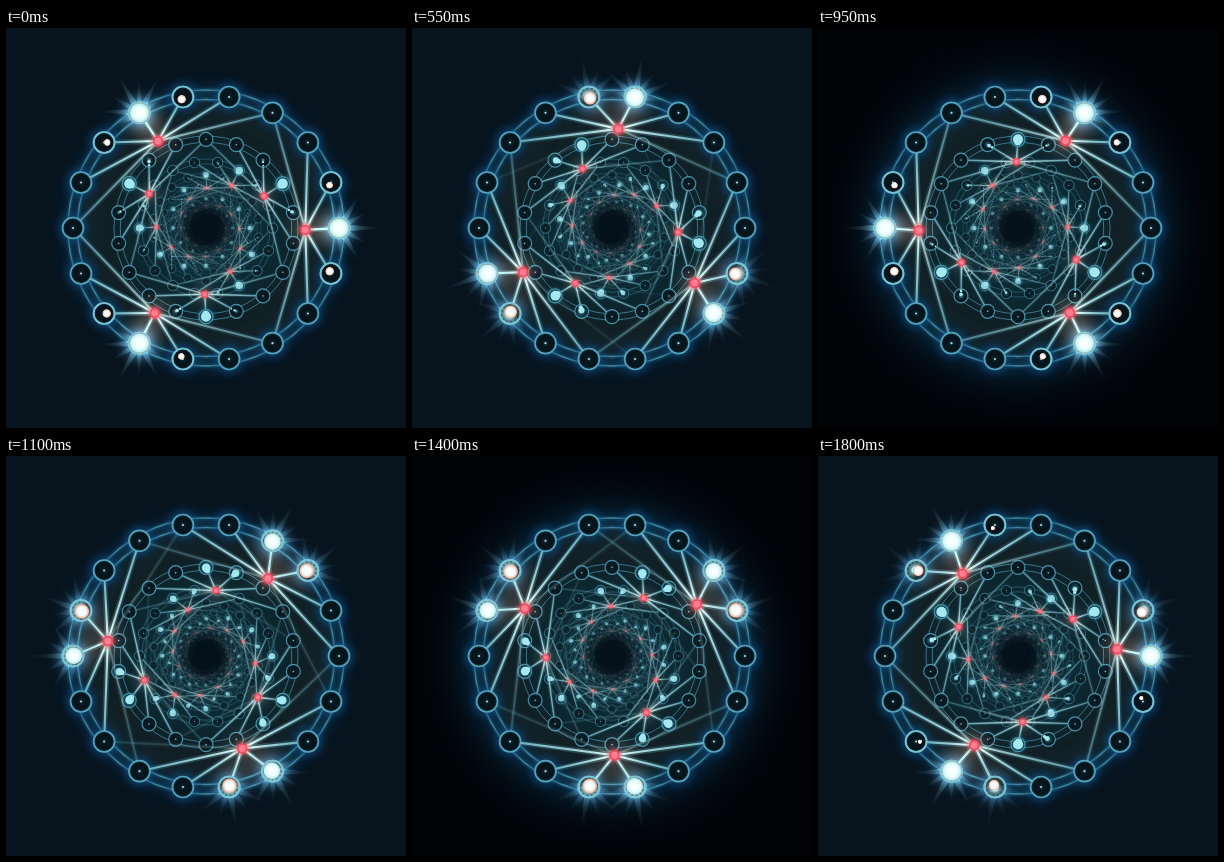
Animation of 400 by 400 pixels, one loop 1.85 s. Source, as an HTML page with a canvas:

```html
<!DOCTYPE html>
<html lang="en">
<head>
<meta charset="utf-8">
<title>Ring tunnel</title>
<style>
html, body { margin: 0; width: 100%; height: 100%; overflow: hidden; background: #07141e; }
canvas { display: block; width: 400px; height: 400px; }
</style>
</head>
<body>
<canvas id="stage" width="400" height="400"></canvas>
<script>
const ctx = document.getElementById('stage').getContext('2d');
const LOOP = 1850, STEP = 50, MID = 200, RAD = Math.PI / 180;
const RING = 133, HUB = 99.3, DEPTH = 13;

// The hubs move in 48 poses of 2.5 degrees at an uneven pace: [time in ms, pose]
const POSE = 2.5, FIRST = 1.1;
const PACE = [[0, 0], [250, 5], [550, 13], [800, 18], [1100, 27], [1400, 35], [1800, 46], [LOOP, 48]];

function turnAt(t) {
  const i = PACE.findIndex(key => key[0] > t);
  const [t0, p0] = PACE[i - 1], [t1, p1] = PACE[i];
  return FIRST + POSE * Math.round(p0 + (p1 - p0) * (t - t0) / (t1 - t0));
}

const isDark = t => (t >= 650 && t < 1000) || (t >= 1250 && t < 1650);
const polar = (r, deg) => [MID + r * Math.cos(deg * RAD), MID + r * Math.sin(deg * RAD)];
const gap = (a, b) => ((a - b) % 360 + 540) % 360 - 180;

function disc(x, y, r, fill) {
  ctx.fillStyle = fill;
  ctx.beginPath();
  ctx.arc(x, y, r, 0, 7);
  ctx.fill();
}

function circle(x, y, r, color, width) {
  ctx.strokeStyle = color;
  ctx.lineWidth = width;
  ctx.beginPath();
  ctx.arc(x, y, r, 0, 7);
  ctx.stroke();
}

function radial(x, y, r, stops) {
  const g = ctx.createRadialGradient(x, y, 0, x, y, r);
  stops.forEach(([at, color]) => g.addColorStop(at, color));
  disc(x, y, r, g);
}

function line(x0, y0, x1, y1, from, to, width) {
  const g = ctx.createLinearGradient(x0, y0, x1, y1);
  g.addColorStop(0, from);
  g.addColorStop(1, to);
  ctx.strokeStyle = g;
  ctx.lineWidth = width;
  ctx.beginPath();
  ctx.moveTo(x0, y0);
  ctx.lineTo(x1, y1);
  ctx.stroke();
}

function glowing(paint) {
  ctx.globalCompositeOperation = 'lighter';
  paint();
  ctx.globalCompositeOperation = 'source-over';
}

function background(dark) {
  ctx.fillStyle = dark ? '#010307' : '#07141e';
  ctx.fillRect(0, 0, 400, 400);
  if (dark) {
    radial(MID, MID, 195, [[0, 'rgba(5,24,36,1)'], [0.75, 'rgba(4,24,38,.9)'], [1, 'rgba(2,8,16,0)']]);
  }
  radial(MID, MID, 160, [
    [0, 'rgba(4,17,25,1)'], [0.12, 'rgba(7,26,35,1)'], [0.24, 'rgba(14,47,57,.95)'],
    [0.45, 'rgba(12,40,49,.95)'], [0.62, 'rgba(17,32,37,.95)'], [0.74, 'rgba(17,35,43,.95)'],
    [0.84, 'rgba(11,48,70,.9)'], [0.88, 'rgba(8,39,63,.7)'], [0.93, 'rgba(5,25,44,.35)'],
    [1, 'rgba(4,17,30,0)']
  ]);
}

function rails(s, k) {
  for (const r of [138, 128.5]) {
    if (k === 0) circle(MID, MID, r, 'rgba(28,105,150,.28)', 5);
    circle(MID, MID, r * s, '#4a93ab', Math.max(0.55, 1.5 * s));
  }
}

function node(x, y, s, k) {
  const r = 10.5 * s;
  if (k === 0) {
    radial(x, y, 22, [[0, 'rgba(20,95,150,.6)'], [0.5, 'rgba(16,82,135,.5)'], [1, 'rgba(5,35,70,0)']]);
  }
  radial(x, y, r, [[0, '#123039'], [0.35, '#07161e'], [0.75, '#06131b'], [1, '#134052']]);
  circle(x, y, r, '#56a3ba', Math.max(0.6, 1.7 * s));
  if (k < 3) disc(x, y, 1.1 * s, '#b5d5dc');
}

function arm(hub, x, y, d, s, alpha) {
  const reach = Math.min(1, (76 - Math.abs(d)) / 24);
  if (reach <= 0) return;
  const cut = 1 - 10.5 * s / Math.hypot(x - hub[0], y - hub[1]);
  const end = [hub[0] + (x - hub[0]) * cut, hub[1] + (y - hub[1]) * cut];
  ctx.globalAlpha = alpha * reach * 0.3;
  line(...hub, ...end, '#8ac4c9', '#2b7793', 5.5 * s);
  ctx.globalAlpha = alpha * reach * 0.95;
  line(...hub, ...end, '#d0f3f3', '#72b5c3', Math.max(0.6, 2.1 * s));
}

function flare(x, y, deg, hub, glow) {
  ctx.globalAlpha = glow;
  glowing(() => {
    const wx = x + (hub[0] - x) * 0.25, wy = y + (hub[1] - y) * 0.25;
    radial(wx, wy, 27, [[0, 'rgba(200,135,100,.5)'], [0.5, 'rgba(110,70,50,.28)'], [1, 'rgba(50,25,15,0)']]);
    radial(x, y, 27, [[0, 'rgba(130,205,215,.65)'], [0.45, 'rgba(75,125,135,.32)'], [1, 'rgba(20,50,60,0)']]);
    for (let i = -3; i <= 3; i++) {
      const a = (deg + i * 29) * RAD;
      const len = (i % 2 ? 36 : 46) - 2 * Math.abs(i);
      const cos = Math.cos(a), sin = Math.sin(a);
      const g = ctx.createRadialGradient(x, y, 0, x, y, len);
      g.addColorStop(0, 'rgba(150,210,215,.6)');
      g.addColorStop(0.45, 'rgba(100,130,130,.32)');
      g.addColorStop(1, 'rgba(45,50,50,0)');
      ctx.fillStyle = g;
      ctx.beginPath();
      ctx.moveTo(x - 4 * sin, y + 4 * cos);
      ctx.lineTo(x + len * cos, y + len * sin);
      ctx.lineTo(x + 4 * sin, y - 4 * cos);
      ctx.fill();
    }
  });
}

function ball(x, y, hub, deg, light, s, k, alpha) {
  const pull = (1 - light) * 0.07;
  const bx = x + (hub[0] - x) * pull, by = y + (hub[1] - y) * pull;
  const r = Math.min(9, 11.4 * light) * s;
  if (k === 0) {
    if (light > 0.35) flare(x, y, deg, hub, light);
    ctx.globalAlpha = 1;
    circle(x, y, 10.5, '#7cc2cf', 1.7);
    radial(bx, by, r + 1.5, [[0, '#ffffff'], [0.55, '#eefeff'],
      [0.85, light > 0.6 ? '#bdf0f3' : '#f3b5a0'], [1, 'rgba(190,110,90,0)']]);
  } else {
    ctx.globalAlpha = Math.min(1, alpha * 1.35);
    radial(x, y, r * 1.9, [[0, 'rgba(90,195,215,.6)'], [1, 'rgba(30,130,160,0)']]);
    disc(bx, by, r * 0.85, '#a4e8f0');
    disc(bx + (hub[0] - x) * 0.1, by + (hub[1] - y) * 0.1, r * 0.6, '#a4e8f0');
  }
}

function hubDot(x, y, s, k, alpha) {
  ctx.globalAlpha = alpha;
  glowing(() => radial(x, y, 27 * s, [[0, 'rgba(180,130,110,.5)'],
    [0.4, 'rgba(100,70,58,.3)'], [1, 'rgba(30,20,15,0)']]));
  ctx.globalAlpha = k < 2 ? 1 : 1.1 / k;
  radial(x, y, 9.5 * s, [[0, 'rgba(250,70,90,.85)'], [0.6, 'rgba(215,75,80,.45)'], [1, 'rgba(140,50,50,0)']]);
  disc(x, y, 5.2 * s, '#f04a64');
  disc(x, y, 3.4 * s, '#ff7f91');
}

function ring(k, turn) {
  const s = 2 / (2 + k);
  const alpha = k === 0 ? 1 : 0.85 / (1 + 0.33 * (k - 1));
  const shift = -30 * k;
  const hubs = [0, 120, 240].map(a => ({ deg: turn + shift + a, at: polar(HUB * s, turn + shift + a) }));
  const nodes = Array.from({ length: 18 }, (_, j) => ({ deg: shift + j * 20, at: polar(RING * s, shift + j * 20) }));
  ctx.globalAlpha = alpha * 0.85;
  rails(s, k);
  for (const n of nodes) {
    ctx.globalAlpha = alpha;
    node(...n.at, s, k);
  }
  for (const h of hubs) {
    for (const n of nodes) arm(h.at, ...n.at, gap(n.deg, h.deg), s, alpha);
  }
  for (const h of hubs) {
    for (const n of nodes) {
      const light = 1 - Math.abs(gap(n.deg, h.deg)) / 26;
      if (light > 0) ball(...n.at, h.at, n.deg, light, s, k, alpha);
    }
    hubDot(...h.at, s, k, alpha);
  }
}

function draw(t) {
  const turn = turnAt(t);
  ctx.globalAlpha = 1;
  background(isDark(t));
  for (let k = DEPTH - 1; k >= 0; k--) ring(k, turn);
  ctx.globalAlpha = 1;
  radial(MID, MID, 32, [[0, '#04111a'], [0.5, 'rgba(4,17,26,.9)'], [1, 'rgba(4,17,26,0)']]);
}

const start = performance.now();
function tick() {
  const t = (performance.now() - start) % LOOP;
  draw(Math.floor(t / STEP) * STEP);
  requestAnimationFrame(tick);
}
tick();
</script>
</body>
</html>
```
